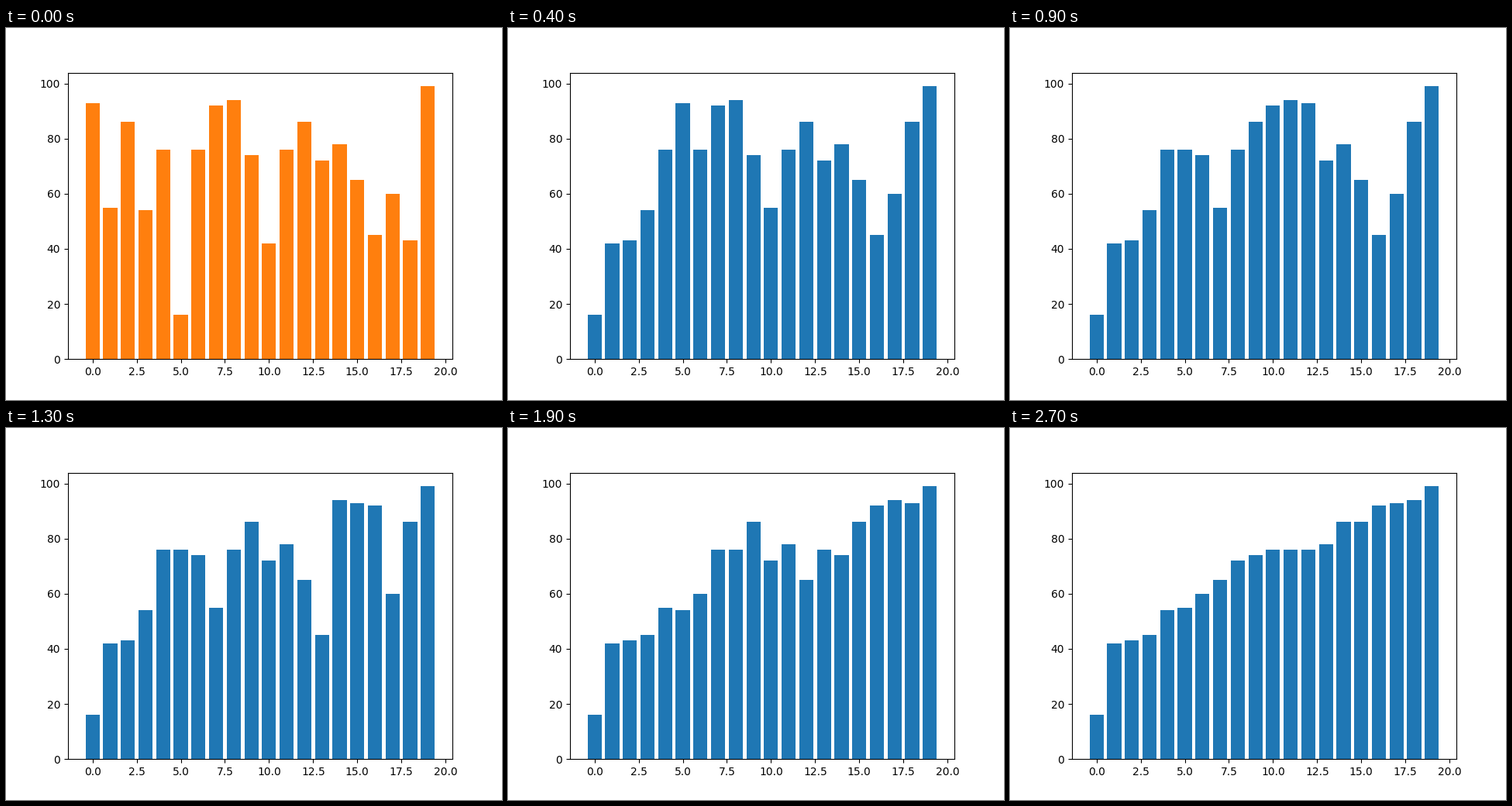
Recreate the animation shown at these times as a matplotlib script. Size 640 px wide and 480 px high, loop 2800 ms.

```python
import matplotlib.pyplot as plt
from matplotlib.animation import FuncAnimation

VALUES = [93, 55, 86, 54, 76, 16, 76, 92, 94, 74,
          42, 76, 86, 72, 78, 65, 45, 60, 43, 99]
INTERVAL = 100  # ms


def swap(data, i, j):
    """Swap two items and yield a snapshot, skipping swaps in place."""
    if i != j:
        data[i], data[j] = data[j], data[i]
        yield data[:]


def quicksort(data, low, high):
    """Quicksort with the last item as pivot, yielding after each swap."""
    if low >= high:
        return
    pivot = data[high]
    split = low
    for k in range(low, high):
        if data[k] <= pivot:
            yield from swap(data, split, k)
            split += 1
    yield from swap(data, split, high)
    yield from quicksort(data, low, split - 1)
    yield from quicksort(data, split + 1, high)


# The unsorted data shows twice: first in orange, then in blue.
steps = [VALUES, VALUES, *quicksort(VALUES[:], 0, len(VALUES) - 1)]

fig, ax = plt.subplots(figsize=(6.4, 4.8), dpi=100)
bars = ax.bar(range(len(VALUES)), VALUES)


def draw(frame):
    color = "C1" if frame == 0 else "C0"
    for bar, height in zip(bars, steps[frame]):
        bar.set_height(height)
        bar.set_color(color)
        bar.set_linewidth(0)
    return bars


anim = FuncAnimation(fig, draw, frames=len(steps), interval=INTERVAL,
                     init_func=lambda: draw(0), repeat=True, repeat_delay=0)

plt.show()
```
